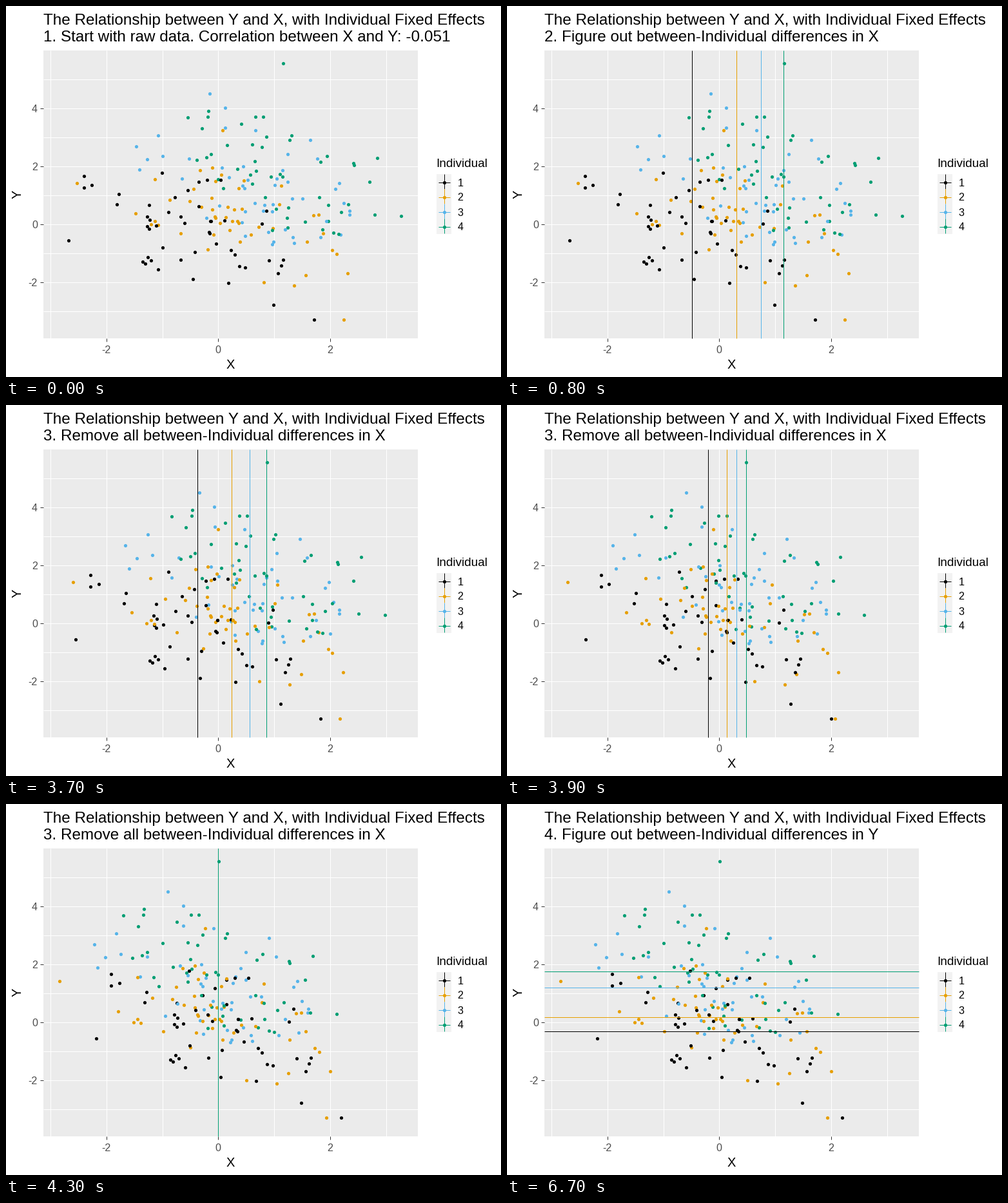
These frames come from a looping animation (768x576 px, 8 s). A matplotlib script:

```python
import numpy as np
import matplotlib.pyplot as plt
from matplotlib.animation import FuncAnimation
from matplotlib.patches import Rectangle

WIDTH, HEIGHT, DPI = 768, 576, 96
STEP_MS, LOOP_MS = 100, 8000
PX = 72 / DPI  # points per pixel
LEFT, RIGHT, TOP, BOTTOM = 58, 639, 69, 516
COLORS = ["#000000", "#E69F00", "#56B4E9", "#009E73"]

GROUP_SIZE = 50
SLOPE = -0.5  # relation of Y to X within each individual
MEANS = np.array([[-0.49, -0.30], [0.313, 0.19], [0.745, 1.21], [1.15, 1.77]])
EXTREMES = [
    [(-2.66, -0.56), (-2.39, 1.66), (1.00, -2.79), (1.72, -3.30)],
    [(-2.51, 1.42), (0.09, 3.22), (2.32, -1.70), (2.26, -3.30)],
    [(-0.14, 4.49), (0.13, 4.00), (-1.26, 2.22), (1.66, 2.89)],
    [(1.17, 5.54), (-0.17, 3.89), (2.85, 2.27), (3.28, 0.28)],
]

HEADING = "The Relationship between Y and X, with Individual Fixed Effects"
STEPS = [
    (0, "1. Start with raw data. Correlation between X and Y: -0.051"),
    (500, "2. Figure out between-Individual differences in X"),
    (3500, "3. Remove all between-Individual differences in X"),
    (6400, "4. Figure out between-Individual differences in Y"),
]


def px(x):
    return np.floor(328.8 + 86.8 * np.asarray(x)) + 0.5


def py(y):
    return np.floor(338.9 - 45 * np.asarray(y)) + 0.5


def make_group(extremes, mean, rng):
    """Add a random sloped cloud to the extremes so that the mean is exact."""
    extremes = np.array(extremes)
    count = GROUP_SIZE - len(extremes)
    radius = 2 * rng.random(count) ** 0.65
    angle = 2 * np.pi * rng.random(count)
    dx = radius * np.cos(angle)
    cloud = np.column_stack([dx, SLOPE * dx + radius * np.sin(angle)])
    target = (GROUP_SIZE * mean - extremes.sum(axis=0)) / count
    return np.vstack([extremes, cloud - cloud.mean(axis=0) + target])


rng = np.random.default_rng(12)
data = np.stack([make_group(e, m, rng) for e, m in zip(EXTREMES, MEANS)], axis=1)

fig = plt.figure(figsize=(WIDTH / DPI, HEIGHT / DPI), dpi=DPI, facecolor="white")
ax = fig.add_axes([0, 0, 1, 1])
ax.set_xlim(0, WIDTH)
ax.set_ylim(HEIGHT, 0)
ax.axis("off")


def box(x0, y0, x1, y1, color):
    ax.add_patch(Rectangle((x0, y0), x1 - x0, y1 - y0, fc=color, lw=0, zorder=0))


def line(xs, ys, color, zorder):
    return ax.plot(xs, ys, color=color, lw=PX, solid_capstyle="butt",
                   zorder=zorder)[0]


def dots(x, y, colors, zorder):
    return ax.scatter(x, y, s=(5.2 * PX) ** 2, c=colors, linewidths=0,
                      zorder=zorder)


def label(x, y, text, size, color="black", **kwargs):
    kwargs = {"va": "baseline", **kwargs}
    return ax.text(x, y, text, fontsize=size * PX, color=color,
                   family="Liberation Sans", **kwargs)


def draw_panel():
    box(LEFT, TOP, RIGHT, BOTTOM, "#EBEBEB")
    for v in range(-3, 4):
        line([px(v)] * 2, [TOP, BOTTOM], "white", 1)
    for v in range(-3, 6):
        line([LEFT, RIGHT], [py(v)] * 2, "white", 1)
    for v in (-2, 0, 2):
        line([px(v)] * 2, [BOTTOM, BOTTOM + 5], "#333333", 1)
        label(px(v), 539, str(v), 16.1, "#4D4D4D", ha="center")
    for v in (-2, 0, 2, 4):
        line([LEFT - 5, LEFT], [py(v)] * 2, "#333333", 1)
        label(49, py(v) + 6.5, str(v), 16.1, "#4D4D4D", ha="right")
    label(348.5, 563, "X", 20, ha="center")
    label(18.5, 292.5, "Y", 20, rotation=90, ha="center", va="center")


def draw_legend():
    label(667.5, 250, "Individual", 19)
    box(668, 261, 691, 354, "#F2F2F2")
    for i, color in enumerate(COLORS):
        top = 261 + 23.1 * i
        middle = np.floor(top + 12) + 0.5
        line([679.5] * 2, [top, top + 23], color, 2)
        line([671, 689], [middle] * 2, color, 2)
        dots([679.5], [middle], [color], 3)
        label(700.5, middle + 6, str(i + 1), 16.1)


draw_panel()
draw_legend()
label(57.5, 29, HEADING, 24.27)
subtitle = label(57.5, 55, "", 24.27)
points = dots(px(data[..., 0]).ravel(), py(data[..., 1]).ravel(),
              COLORS * GROUP_SIZE, 3)
mean_lines = [line([], [], c, 4) for c in COLORS]


def removed_share(t):
    """Share of the X differences removed, eased as a sine in and out."""
    progress = np.clip((t - 3400) / 900, 0, 1)
    return np.sin(np.pi / 2 * progress) ** 2


def update(frame):
    t = frame * STEP_MS
    subtitle.set_text([text for start, text in STEPS if t >= start][-1])

    share = removed_share(t)
    x = data[..., 0] - share * MEANS[:, 0]
    points.set_offsets(np.column_stack([px(x).ravel(), py(data[..., 1]).ravel()]))

    for artist, (mx, my) in zip(mean_lines, MEANS):
        artist.set_visible(800 <= t < 6400 or t >= 6700)
        if t < 6400:
            artist.set_data([px(mx * (1 - share))] * 2, [TOP, BOTTOM])
        else:
            artist.set_data([LEFT, RIGHT], [py(my)] * 2)
    return [subtitle, points, *mean_lines]


anim = FuncAnimation(fig, update, frames=LOOP_MS // STEP_MS, interval=STEP_MS,
                     repeat=True, repeat_delay=0, blit=False)
plt.show()
```
